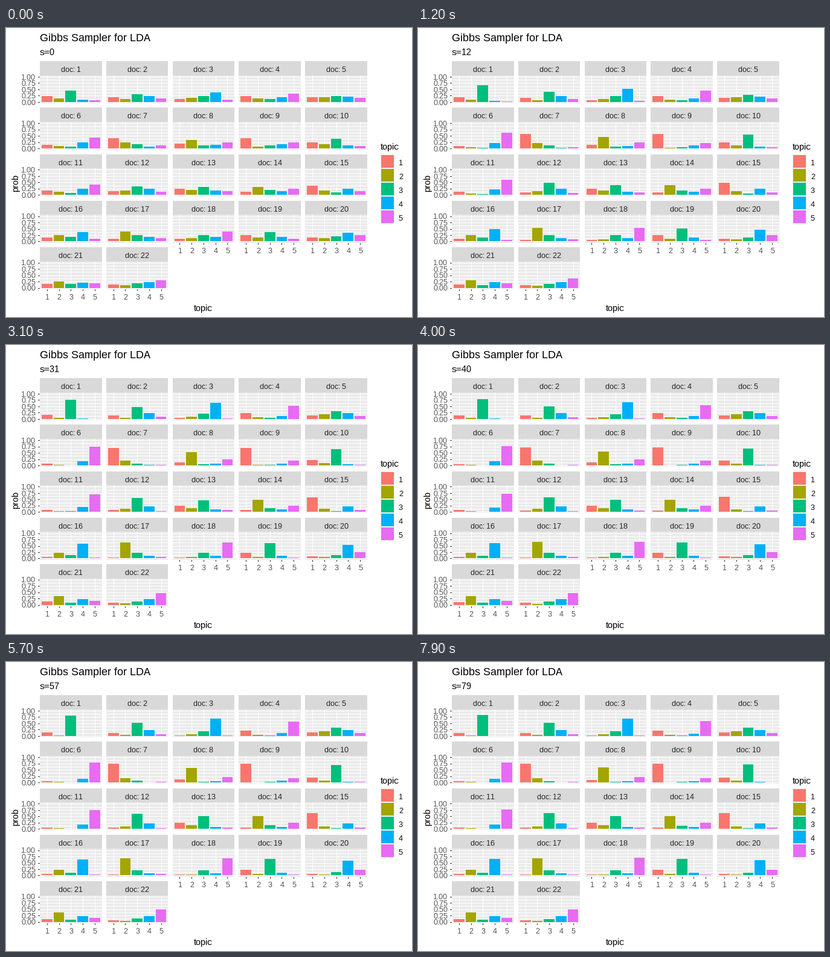
Animation, 672 px wide and 480 px high, one loop 8 s. Source, as a matplotlib script:

```python
import numpy as np
import matplotlib.pyplot as plt
from matplotlib.animation import FuncAnimation
from matplotlib.patches import Rectangle

# Whole-pixel glyph spacing
plt.rcParams.update({"font.family": "Liberation Sans",
                     "text.hinting": "default", "text.hinting_factor": 1})

W, H, DPI = 672, 480, 96
FRAMES, STEP_MS = 80, 100
COLORS = ["#F8766D", "#A3A500", "#00BF7D", "#00B0F6", "#E76BF3"]

# Per document: topics from most to least likely, and the falloff between them
DOCS = [("31245", .15), ("34152", .43), ("43215", .26), ("51423", .37),
        ("34215", .70), ("54123", .18), ("12354", .22), ("25143", .37),
        ("15432", .22), ("31245", .25), ("54123", .21), ("34215", .34),
        ("31245", .46), ("25341", .45), ("14253", .33), ("42315", .32),
        ("23451", .28), ("53421", .27), ("31425", .31), ("45312", .37),
        ("24513", .62), ("54312", .45)]

# Panel layout in pixels
LEFT, COL_STEP, PANEL_W = 56.05, 109.8, 102.6
TOP, ROW_STEP, STRIP_H, PANEL_H = 55.11, 77.2, 23.73, 46.13
UNIT_X, UNIT_Y = PANEL_W / 5.2, PANEL_H / 1.1


def probs(order, falloff, s):
    """Topic shares that sharpen from nearly flat as sampling goes on."""
    sharpness = 1 - 0.65 * np.exp(-s / 22)
    ranks = np.array([order.index(str(t)) for t in range(1, 6)])
    weights = falloff ** (sharpness * ranks ** 0.8)
    return weights / weights.sum()


fig = plt.figure(figsize=(W / DPI, H / DPI), dpi=DPI, facecolor="white")
ax = fig.add_axes([0, 0, 1, 1])
ax.set_xlim(0, W)
ax.set_ylim(H, 0)
ax.axis("off")


def box(x0, y0, x1, y1, color):
    x0, y0, x1, y1 = (int(round(v)) for v in (x0, y0, x1, y1))
    return ax.add_patch(Rectangle((x0, y0), x1 - x0, y1 - y0, fc=color,
                                  lw=0, antialiased=False))


def hline(x0, x1, y, color):
    box(x0, round(y), x1, round(y) + 1, color)


def vline(x, y0, y1, color):
    box(round(x), y0, round(x) + 1, y1, color)


def label(x, y, s, px=12, color="black", ha="left", **kw):
    return ax.text(x, y, s, fontsize=px * 72 / DPI, color=color, ha=ha,
                   va="baseline", **kw)


def panel(i):
    """Draw one facet and return its bars with their base line."""
    row, col = divmod(i, 5)
    x0, y0 = LEFT + col * COL_STEP, TOP + row * ROW_STEP
    x1, top = x0 + PANEL_W, y0 + STRIP_H
    bottom = top + PANEL_H
    zero = bottom - 0.05 * UNIT_Y
    centers = [x0 + (0.6 + k) * UNIT_X for k in range(5)]

    box(x0, y0, x1, top, "#D9D9D9")
    label((x0 + x1) / 2, round(y0 + 18), f"doc: {i + 1}",
          color="#1A1A1A", ha="center")
    box(x0, top, x1, bottom, "#EBEBEB")
    for k in range(9):
        hline(x0, x1, zero - k / 8 * UNIT_Y, "white")
    for x in centers:
        vline(x, top, bottom, "white")

    if col == 0:
        for k in range(5):
            y = zero - k / 4 * UNIT_Y
            hline(x0 - 3.5, x0, y, "#333333")
            label(49.3, round(y + 4.7), f"{k / 4:.2f}",
                  color="#4D4D4D", ha="right")
    if i + 5 >= len(DOCS):
        for k, x in enumerate(centers):
            vline(x, bottom, bottom + 3.5, "#333333")
            label(x + 0.5, round(bottom + 17.4), str(k + 1),
                  color="#4D4D4D", ha="center")

    half = 0.45 * UNIT_X
    base = round(zero)
    return base, [box(x - half, base, x + half, base, c)
                  for x, c in zip(centers, COLORS)]


panels = [panel(i) for i in range(len(DOCS))]

label(56, 22, "Gibbs Sampler for LDA", 18)
subtitle = label(56, 45, "s=0", 15)
label(326, 470, "topic", 15, ha="center")
label(20, 257, "prob", 15, ha="center", rotation=90, rotation_mode="anchor")

KEY, KEY_X, KEY_Y = 23.04, 620.3, 209.6
label(619.5, 202, "topic", 15)
box(KEY_X, KEY_Y, KEY_X + KEY, KEY_Y + 5 * KEY, "#F2F2F2")
for k, c in enumerate(COLORS):
    y = KEY_Y + k * KEY
    box(KEY_X + 1, y + 1, KEY_X + KEY - 1, y + KEY - 1, c)
    label(650, round(y + KEY / 2 + 6.6), str(k + 1))


def draw(s):
    for (base, bars), doc in zip(panels, DOCS):
        for bar, p in zip(bars, probs(*doc, s)):
            height = int(round(p * UNIT_Y))
            bar.set_y(base - height)
            bar.set_height(height)
    subtitle.set_text(f"s={s}")
    return [subtitle]


anim = FuncAnimation(fig, draw, frames=FRAMES, interval=STEP_MS,
                     repeat=True, repeat_delay=0, blit=False)
plt.show()
```
